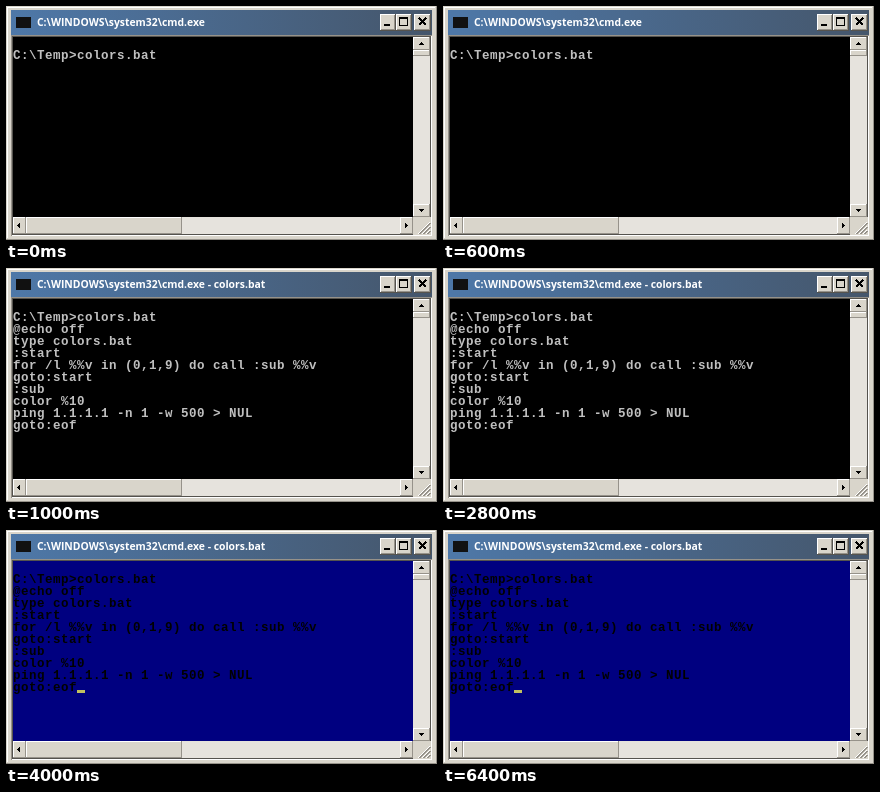
These frames come from a looping animation (431 by 234 pixels, 8000 ms). An HTML page:

```html
<!DOCTYPE html>
<html lang="en">
<head>
<meta charset="utf-8">
<title>Console colours</title>
<style>
html, body { margin: 0; width: 100%; height: 100%; overflow: hidden; background: #fff; }
svg { display: block; width: 431px; height: 234px; }
#title { font: 700 10.4px "Open Sans", "Noto Sans", sans-serif; fill: #fff; }
#lines { font: 700 12.5px "Liberation Mono", monospace; letter-spacing: .5px; white-space: pre; }
</style>
</head>
<body>
<svg id="stage" viewBox="0 0 431 234" xmlns="http://www.w3.org/2000/svg">
  <defs>
    <linearGradient id="bar">
      <stop offset="0" stop-color="#4e78a8"/>
      <stop offset="1" stop-color="#45566b"/>
    </linearGradient>
  </defs>
  <g id="frame" shape-rendering="crispEdges"></g>
  <rect x="10" y="11" width="15" height="11" fill="#111"/>
  <text id="title" x="31" y="20"></text>
  <rect id="screen" x="7" y="31" width="400" height="180" shape-rendering="crispEdges"/>
  <g id="lines"></g>
  <rect id="cursor" x="71" y="160" width="8" height="3" fill="#c0c060" shape-rendering="crispEdges"/>
</svg>
<script>
const NS = "http://www.w3.org/2000/svg";
const $ = id => document.getElementById(id);
const FACE = "#d9d5cb", TRACK = "#e6e3dd", LIGHT = "#fff", SHADE = "#96928a", DARK = "#55534e";

function add(parent, tag, attrs, text) {
  const el = document.createElementNS(NS, tag);
  for (const k in attrs) el.setAttribute(k, attrs[k]);
  if (text) el.textContent = text;
  parent.appendChild(el);
  return el;
}

const rect = (x, y, width, height, fill) => add($("frame"), "rect", { x, y, width, height, fill });
const path = (d, attrs) => add($("frame"), "path", { d, ...attrs });

function raised(x, y, w, h) {
  rect(x, y, w, h, DARK);
  rect(x, y, w - 1, h - 1, LIGHT);
  rect(x + 1, y + 1, w - 2, h - 2, SHADE);
  rect(x + 1, y + 1, w - 3, h - 3, FACE);
}

// Softer bevel for the scrollbar parts
function soft(x, y, w, h) {
  rect(x, y, w, h, SHADE);
  rect(x, y, w - 1, h - 1, LIGHT);
  rect(x + 1, y + 1, w - 2, h - 2, FACE);
}

// Triangle built from pixel rows, pointing along (dx, dy)
function arrow(x, y, dx, dy) {
  for (let i = 0; i < 3; i++) {
    const n = 2 * i + 1;
    if (dy) rect(x - i, y - dy * i, n, 1, "#000");
    else rect(x - dx * i, y - i, 1, n, "#000");
  }
}

function drawFrame() {
  rect(0, 0, 431, 234, SHADE);
  rect(0, 0, 430, 233, FACE);
  rect(1, 1, 428, 231, LIGHT);
  rect(2, 2, 427, 230, FACE);
  rect(5, 4, 421, 25, "url(#bar)");
  rect(5, 29, 421, 201, SHADE);
  rect(6, 30, 420, 200, LIGHT);
  rect(6, 30, 419, 199, DARK);

  raised(374, 8, 16, 17);
  rect(378, 18, 6, 2, "#000");
  raised(390, 8, 16, 17);
  rect(393, 11, 9, 9, "#000");
  rect(394, 13, 7, 6, FACE);
  raised(408, 8, 17, 17);
  path("M413 12l7 7M420 12l-7 7", { stroke: "#000", "stroke-width": 1.7, fill: "none" });

  rect(407, 31, 17, 180, TRACK);
  soft(407, 31, 17, 13);
  arrow(415, 36, 0, -1);
  soft(407, 44, 17, 6);
  soft(407, 198, 17, 13);
  arrow(415, 205, 0, 1);

  rect(7, 211, 400, 17, TRACK);
  soft(7, 211, 13, 17);
  arrow(11, 219, -1, 0);
  soft(20, 211, 156, 17);
  soft(394, 211, 13, 17);
  arrow(401, 219, 1, 0);

  rect(407, 211, 18, 18, FACE);
  for (const n of [3, 7, 11]) {
    path(`M${424 - n} 228L424 ${228 - n}`, { stroke: SHADE, "stroke-width": 1.5 });
    path(`M${423 - n} 228L424 ${227 - n}`, { stroke: LIGHT, "stroke-width": 1 });
  }
}

const SCRIPT = [
  "C:\\Temp>colors.bat",
  "@echo off",
  "type colors.bat",
  ":start",
  "for /l %%v in (0,1,9) do call :sub %%v",
  "goto:start",
  ":sub",
  "color %10",
  "ping 1.1.1.1 -n 1 -w 500 > NUL",
  "goto:eof"
];
const LOOP = 8000, RUN = 1000, RECOLOR = 4000;
const PATH = "C:\\WINDOWS\\system32\\cmd.exe";

drawFrame();
const rows = SCRIPT.map((s, i) => add($("lines"), "text", { x: 7, y: 53 + 12 * i }, s));

function render(t) {
  const running = t >= RUN, blue = t >= RECOLOR;
  $("title").textContent = PATH + (running ? " - colors.bat" : "");
  $("screen").setAttribute("fill", blue ? "#000080" : "#000");
  $("lines").setAttribute("fill", blue ? "#000" : "#c0c0c0");
  rows.forEach((row, i) => row.setAttribute("visibility", running || i === 0 ? "visible" : "hidden"));
  $("cursor").setAttribute("visibility", blue ? "visible" : "hidden");
}

const start = performance.now();
function tick() {
  render((performance.now() - start) % LOOP);
  requestAnimationFrame(tick);
}
tick();
</script>
</body>
</html>
```
